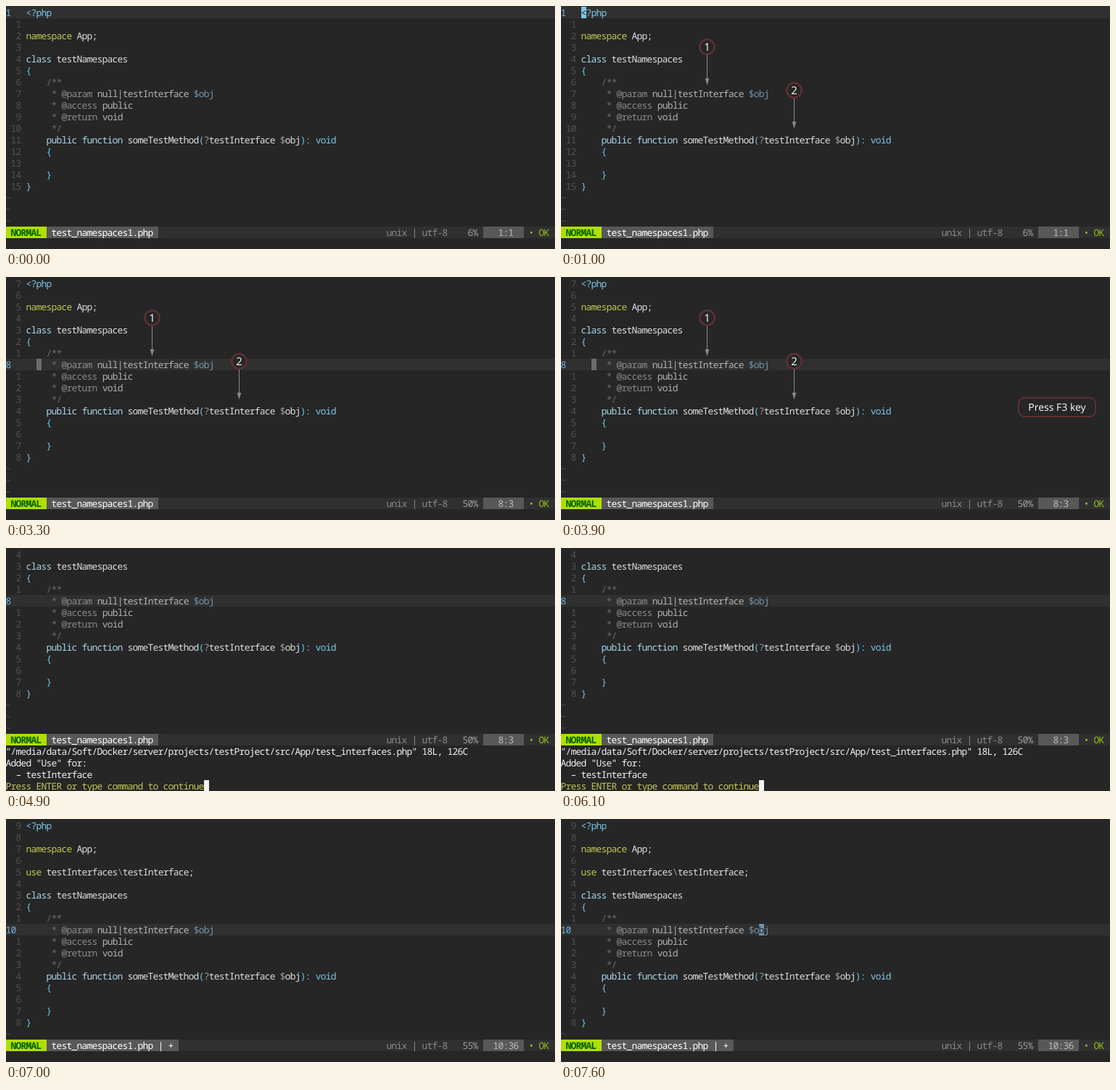
An HTML page that plays this animation: 757 px wide and 336 px high, repeating every 8000 ms.

```html
<!DOCTYPE html>
<html lang="en">
<head>
<meta charset="utf-8">
<title>Editor session</title>
<style>
  html, body { margin: 0; width: 100%; height: 100%; overflow: hidden; background: #262626; }
  svg { display: block; }
  text {
    font: 13px "Noto Sans Mono", "DejaVu Sans Mono", monospace;
    letter-spacing: -.8px; /* 7px terminal cell */
    white-space: pre;
    text-rendering: geometricPrecision;
  }
  .label { font: 14px "Open Sans", "Noto Sans", sans-serif; letter-spacing: 0; text-anchor: middle; }
  .digit { font-size: 15px; }
</style>
</head>
<body>
<svg id="stage" width="757" height="336" viewBox="0 0 757 336"></svg>
<script>
const CELL = 7, ROW = 16, LOOP = 8000;
const stage = document.getElementById('stage');

const color = {
  back: '#262626', bar: '#303030', block: '#585858', number: '#525252', current: '#6bb8e0',
  tag: '#7cc8ea', key: '#c3c751', type: '#a9d6ee', punct: '#6fc3ee', plain: '#dedede',
  comment: '#6c6c6c', doc: '#8a8a8a', docText: '#b2b2b2', variable: '#6f93ab',
  sigil: '#9e9e9e', white: '#f2f2f2', green: '#8fbc1e', ring: '#5e3033', arrow: '#8a8a8a'
};

// Every line is a list of [color, text] runs.
const docLine = (tag, ...rest) => [['comment', '     * '], ['doc', tag], ...rest];
const head = [
  [['tag', '<?php']], [],
  [['key', 'namespace'], ['plain', ' App;']], []
];
const useLines = [
  [['key', 'use'], ['plain', ' testInterfaces'], ['sigil', '\\'], ['plain', 'testInterface;']], []
];
const body = [
  [['type', 'class'], ['plain', ' testNamespaces']],
  [['punct', '{']],
  [['comment', '    /**']],
  docLine('@param', ['docText', ' null|testInterface '], ['variable', '$obj']),
  docLine('@access', ['docText', ' public']),
  docLine('@return', ['docText', ' void']),
  [['comment', '     */']],
  [['type', '    public function'], ['plain', ' someTestMethod'], ['punct', '('], ['sigil', '?'],
    ['plain', 'testInterface '], ['sigil', '$'], ['plain', 'obj'], ['punct', '):'], ['tag', ' void']],
  [['punct', '    {']], [],
  [['punct', '    }']],
  [['punct', '}']]
];
const messages = [
  ['white', '"/media/data/Soft/Docker/server/projects/testProject/src/App/test_interfaces.php" 18L, 126C'],
  ['white', 'Added "Use" for:'],
  ['white', '  – testInterface'],
  ['key', 'Press ENTER or type command to continue']
];

// Each step overrides part of the state from its time on.
const initial = { line: 1, col: 1, percent: '6%', cursor: false, badges: 0, top: 0, statusRow: 19 };
const steps = [
  [500, { cursor: true, badges: 1 }],
  [1000, { badges: 2 }],
  [1800, { line: 8, percent: '50%' }],
  [2200, { cursor: false }],
  [2800, { cursor: true }],
  [3000, { col: 2 }],
  [3300, { col: 3 }],
  [3600, { cursor: false }],
  [3900, { cursor: true, button: true }],
  [4900, { badges: 0, button: false, prompt: true, top: 3, statusRow: 16 }],
  [5500, { cursor: false }],
  [6100, { cursor: true }],
  [6600, { prompt: false, top: 0, statusRow: 19, line: 10, col: 36, percent: '55%', edited: true, pending: true }],
  [6700, { pending: false }],
  [7000, { cursor: false }],
  [7600, { cursor: true }]
];

const escapeText = s => s.replace(/&/g, '&amp;').replace(/</g, '&lt;');
const rowTop = row => row * ROW + 1;
const rect = (x, y, w, h, fill) => `<rect x="${x}" y="${y}" width="${w}" height="${h}" fill="${fill}"/>`;
const cells = (row, col, count, fill) => rect(col * CELL, rowTop(row), count * CELL, ROW, fill);
const runs = (row, col, list, extra = '') =>
  `<text x="${col * CELL - .4}" y="${row * ROW + 14}" ${extra}>` +
  list.map(([name, s]) => `<tspan fill="${color[name] || name}">${escapeText(s)}</tspan>`).join('') + '</text>';
const write = (row, col, name, s, extra) => runs(row, col, [[name, s]], extra);

function cursorBlock(row, col, fill, char = '') {
  return cells(row, col, 1, fill) + (char.trim() && write(row, col, 'back', char));
}

function editor(s) {
  const lines = [...head, ...(s.edited ? useLines : []), ...body];
  const active = s.line - 1 - s.top;
  let out = active ? cells(active, 0, 109, color.bar) : rect(0, 0, 757, 17, color.bar);
  for (let row = 0; row < s.statusRow; row++) {
    const line = lines[row + s.top];
    if (!line) {
      out += write(row, 0, 'number', '~');
      continue;
    }
    out += row === active
      ? write(row, 0, 'current', String(s.line))
      : write(row, 0, 'number', String(Math.abs(row - active)).padStart(3));
    out += runs(row, 4, line);
  }
  if (s.cursor && !s.prompt) {
    let offset = s.col - 1;
    const run = lines[s.line - 1].find(([, t]) => offset < t.length || (offset -= t.length, false));
    out += cursorBlock(active, s.col + 3, color[run[0]], run[1][offset]);
  }
  return out;
}

function statusBar(s) {
  const row = s.statusRow, shift = s.pending ? 1 : 0;
  const file = 'test_namespaces1.php' + (s.edited ? ' | +' : '');
  return cells(row, 0, 109, color.bar) +
    cells(row, 0, 8, '#afdf00') + write(row, 1, '#005f00', 'NORMAL', 'font-weight="700" style="font-weight:700"') +
    cells(row, 8, file.length + 2, color.block) + write(row, 9, '#ffffff', file) +
    write(row, 75 + shift, '#8a8a8a', 'unix | utf-8') +
    write(row, 90 + shift, '#9e9e9e', s.percent.padStart(3)) +
    cells(row, 94 + shift, 8, color.block) +
    write(row, 95 + shift, '#bcbcbc', `${String(s.line).padStart(3)}:${s.col}`) +
    (s.pending
      ? write(row, 104, '#c6c6c6', '•') +
        '<path d="M743.5 309.5h7l-7 8h7z" fill="none" stroke="#c6c6c6"/>'
      : write(row, 103, 'green', '• OK'));
}

function prompt(s) {
  const last = messages[3][1].length;
  return messages.map(([name, t], i) => write(17 + i, 0, name, t)).join('') +
    (s.cursor ? cursorBlock(20, last, color.white) : '');
}

function badge(n, x, y) {
  return `<path d="M${x} ${y + 11}v34" stroke="${color.arrow}"/>` +
    `<path d="M${x - 2.8} ${y + 43.5}h5.6l-2.8 9.5z" fill="${color.arrow}"/>` +
    `<circle cx="${x}" cy="${y}" r="10.2" fill="#262626" stroke="${color.ring}" stroke-width="2.5"/>` +
    `<text class="label digit" x="${x}" y="${y + 5.5}" fill="#fff">${n}</text>`;
}

function button() {
  return `<rect x="631" y="167" width="106" height="26" rx="8" fill="#262626" stroke="${color.ring}" stroke-width="2"/>` +
    '<text class="label" x="684" y="185" fill="#fff">Press F3 key</text>';
}

function scene(s) {
  return rect(0, 0, 757, 336, color.back) + editor(s) + statusBar(s) +
    (s.prompt ? prompt(s) : '') +
    (s.badges > 0 ? badge(1, 201.5, 56.5) : '') +
    (s.badges > 1 ? badge(2, 321.5, 116.5) : '') +
    (s.button ? button() : '');
}

let shown = -1;
function update() {
  const time = performance.now() % LOOP;
  const past = steps.filter(([start]) => start <= time);
  if (past.length !== shown) {
    shown = past.length;
    stage.innerHTML = scene(Object.assign({}, initial, ...past.map(step => step[1])));
  }
  requestAnimationFrame(update);
}
update();
</script>
</body>
</html>
```
